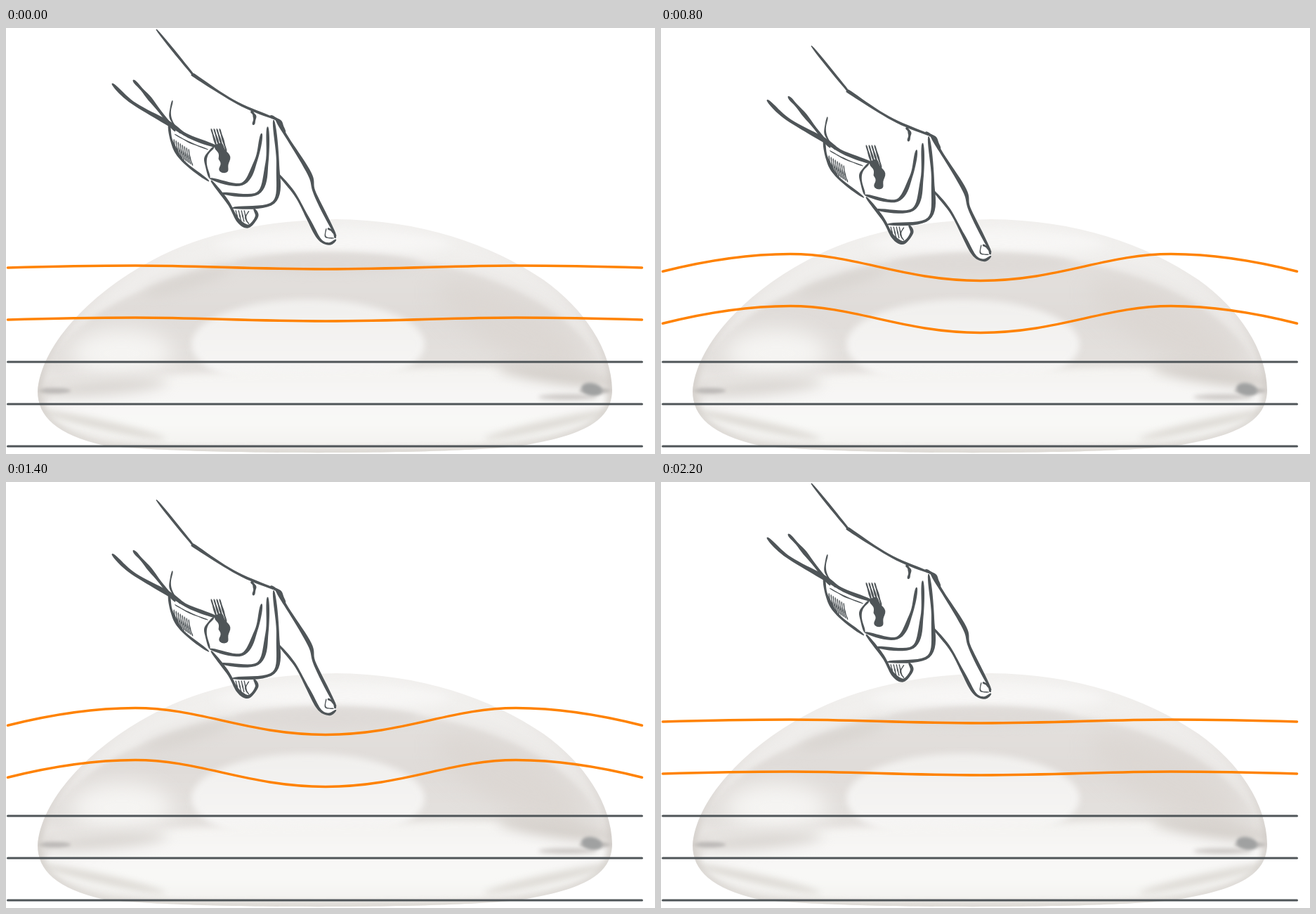
An HTML page with a canvas for the animation above (2.3 s loop, 924x606 px).

```html
<!DOCTYPE html>
<html lang="en">
<head>
<meta charset="utf-8">
<title>Pressure on a gel dome</title>
<style>
html, body { margin: 0; width: 100%; height: 100%; overflow: hidden; background: #fff; }
canvas { display: block; }
</style>
</head>
<body>
<canvas id="stage" width="924" height="606"></canvas>
<script>
const W = 924, H = 606, STEP = 100, STEPS = 23, PEAK = 11;
const INK = '#4f5558', ORANGE = '#ff8200';
const LEFT = 2.5, RIGHT = 905.5, MIDDLE = 455;
const ctx = document.getElementById('stage').getContext('2d');
const mix = (a, b, t) => a + (b - a) * t;

// Smooth curve through x, y pairs, as a list of points.
function curve(...xy) {
  const at = (i, axis) => xy[2 * Math.max(0, Math.min(xy.length / 2 - 1, i)) + axis];
  const spline = (i, t, axis) => {
    const [a, b, c, d] = [-1, 0, 1, 2].map(o => at(i + o, axis));
    return b + 0.5 * t * (c - a + t * (2 * a - 5 * b + 4 * c - d + t * (3 * (b - c) + d - a)));
  };
  const points = [];
  for (let s = 0; s <= (xy.length / 2 - 1) * 10; s++) {
    const i = Math.floor(s / 10), t = s % 10 / 10;
    points.push([spline(i, t, 0), spline(i, t, 1)]);
  }
  return points;
}

function shape(points) {
  const path = new Path2D();
  points.forEach(([x, y]) => path.lineTo(x, y));
  path.closePath();
  return path;
}

// Pen stroke along a curve: pointed ends, slightly uneven pressure.
function brush(width, points) {
  const left = [], right = [], last = points.length - 1;
  points.forEach(([x, y], i) => {
    const p = points[Math.max(0, i - 1)], q = points[Math.min(last, i + 1)];
    const t = i / last, dx = q[0] - p[0], dy = q[1] - p[1];
    const press = 0.25 + 0.6 * Math.sqrt(Math.sin(Math.PI * t) + 1e-9) + 0.15 * Math.sin(16 * t);
    const s = width * press / 2 / (Math.hypot(dx, dy) || 1);
    left.push([x - dy * s, y + dx * s]);
    right.unshift([x + dy * s, y - dx * s]);
  });
  return shape(left.concat(right));
}

function makeHand() {
  const back = curve(214, 2, 262, 61, 270, 69, 330, 107, 388, 131);
  const fingerTop = curve(384, 128, 398, 152, 432, 207, 440, 236, 470, 296);
  const fingerUnder = curve(386, 206, 411, 236, 430, 271, 446, 300, 460, 307, 470, 301);
  const heel = curve(232, 135, 236, 161, 252, 189, 289, 218);
  const pinky = curve(292, 217, 316, 248, 330, 273, 345, 282, 357, 268, 353, 257);
  const cuff = curve(151, 79, 180, 106, 232, 136, 260, 154, 303, 170);
  const ink = [
    brush(5, back), brush(6, fingerTop), brush(5, fingerUnder),
    brush(5, heel), brush(6, pinky), brush(7, cuff),
    brush(6, curve(181, 74, 205, 101, 241, 147)),
    brush(3, curve(237, 103, 234, 127, 248, 150)),
    brush(6, curve(376, 125, 390, 134, 397, 150)),
    brush(5, curve(349, 118, 354, 126, 352, 138)),
    brush(4, curve(296, 169, 284, 186, 290, 214)),
    brush(2, curve(240, 151, 262, 163, 288, 173)),
    brush(2, curve(456, 285, 455, 297, 467, 299)),
    brush(4, curve(458, 285, 466, 290, 469, 299)),
    brush(2, curve(346, 260, 341, 270, 346, 279)),
    brush(17, curve(301, 165, 311, 185, 309, 206))
  ];
  // curled fingers, from the inner one to the outer one
  for (const t of [0, 0.5, 1]) {
    ink.push(brush(6, curve(
      mix(364, 381, t), mix(150, 131, t), mix(356, 387, t), mix(188, 195, t),
      mix(336, 381, t), mix(222, 248, t), mix(290, 322, t), mix(214, 256, t))));
  }
  // creases above the hollow, then shading on the heel and the little finger
  for (let i = 0; i < 4; i++) {
    ink.push(brush(3, curve(292 + 4 * i, 143, 302 + 4 * i, 176)));
    ink.push(brush(2, curve(327 + 4 * i, 259, 331 + 4 * i, 276)));
  }
  for (let i = 0; i < 8; i++) {
    const x = 239 + 3 * i, y = 158 + 2 * i;
    ink.push(brush(2, curve(x, y, x + 2, y + 13, x + 6, y + 24)));
  }
  const skin = shape([...back, ...fingerTop, ...fingerUnder.reverse(), ...pinky.reverse(), ...heel.reverse(), ...cuff.reverse().slice(-24)]);
  return { skin, ink };
}

function fade(g, top, bottom, ...colors) {
  const grad = g.createLinearGradient(0, top, 0, bottom);
  colors.forEach((c, i) => grad.addColorStop(i / (colors.length - 1), c));
  return grad;
}

function makeDome() {
  const c = document.createElement('canvas');
  c.width = W; c.height = H;
  const g = c.getContext('2d');
  const layer = (path, fill, blur) => {
    g.filter = `blur(${blur}px)`;
    g.fillStyle = fill;
    g.fill(path);
  };
  const glow = (x, y, rx, ry, turn, fill, blur) => {
    const path = new Path2D();
    path.ellipse(x, y, rx, ry, turn, 0, 2 * Math.PI);
    layer(path, fill, blur);
  };
  const rim = new Path2D(`M45 517C49 455 115 380 207 331C280 291 375 273 470 272
    C590 273 690 307 765 358C824 400 862 458 863 515C863 558 822 580 735 594
    C640 607 270 608 140 594C72 579 45 552 45 517Z`);
  g.clip(rim);
  g.fillStyle = fade(g, 272, H, '#f3f2f0', '#eeecea', '#e9e6e3', '#efedea');
  g.fill(rim);
  glow(465, 305, 170, 18, 0, '#f7f6f5', 9);

  // grey body below the bright rim
  layer(new Path2D('M55 490C100 380 310 319 455 319C610 319 800 370 852 490Z'),
    fade(g, 320, 490, '#e4e1de', '#e0dcd9', '#e5e2df'), 3);
  glow(455, 336, 130, 14, 0, '#dedad7', 6);
  glow(260, 360, 65, 10, -0.3, '#d9d5d1', 8);
  glow(720, 425, 120, 38, 0.5, '#dcd7d3', 16);

  // reflections
  glow(165, 463, 72, 34, 0, '#f5f4f2', 15);
  glow(430, 450, 166, 64, 0, fade(g, 386, 490, '#f0efed', '#f6f5f4'), 5);

  // lower half
  layer(new Path2D('M70 506Q260 488 530 488Q740 472 850 505L862 555Q740 606 455 606Q170 606 50 553Z'),
    fade(g, 480, H, '#f3f2ef', '#f7f6f5', '#f8f8f6', '#f1f0ed'), 5);
  glow(135, 511, 95, 11, -0.08, '#d8d4d0', 9);
  glow(785, 495, 85, 11, 0.14, '#d3cec9', 8);
  glow(450, 602, 330, 5, 0, '#e3e0db', 4);
  for (const side of [-1, 1]) {
    glow(454 + side * 320, 564, 95, 7, side * -0.22, '#dfdcd7', 5);
    glow(454 + side * 385, 516, 23, 4, 0, '#bdbab8', 2);
  }
  glow(800, 525, 42, 4, 0, '#cbc7c4', 3);
  glow(834, 514, 15, 9, 0.2, '#a0a1a1', 2);

  // soft shaded sides
  g.filter = 'blur(5px)';
  g.lineWidth = 7;
  g.strokeStyle = fade(g, 300, H, '#f0eeec', '#e4e0dd', '#cac5c0', '#d8d4cf');
  g.stroke(rim);
  return c;
}

// Two crests rise while the trough below the fingertip sinks.
function wave(y, p) {
  const edge = y - 0.3 + 0.65 * p, crest = y - 3.4 - 2.06 * p, trough = y + 1.6 + 2.06 * p;
  const path = new Path2D();
  for (const [end, side] of [[LEFT, -1], [RIGHT, 1]]) {
    const top = MIDDLE + side * 271;
    path.moveTo(end, edge);
    path.bezierCurveTo(mix(end, top, 0.31), mix(edge, crest, 0.57), mix(end, top, 0.66), crest, top, crest);
    path.bezierCurveTo(top - side * 93, crest, MIDDLE + side * 111, trough, MIDDLE, trough);
  }
  return path;
}

function line(path, color, width) {
  ctx.strokeStyle = color;
  ctx.lineWidth = width;
  ctx.lineCap = 'round';
  ctx.stroke(path);
}

const dome = makeDome(), hand = makeHand();

function draw(p) {
  ctx.fillStyle = '#fff';
  ctx.fillRect(0, 0, W, H);
  ctx.drawImage(dome, 0, 0);
  for (const y of [475, 535, 595]) line(new Path2D(`M${LEFT} ${y}H${RIGHT}`), INK, 3);
  for (const y of [341.3, 415.3]) line(wave(y, p), ORANGE, 3.5);
  ctx.save();
  ctx.translate(0, p * 2.92);
  ctx.fillStyle = '#fff';
  ctx.fill(hand.skin);
  ctx.fillStyle = INK;
  hand.ink.forEach(s => ctx.fill(s));
  ctx.restore();
}

const start = performance.now();
function tick() {
  const k = Math.floor((performance.now() - start) / STEP) % STEPS;
  draw(PEAK - Math.abs(k - PEAK));
  requestAnimationFrame(tick);
}
tick();
</script>
</body>
</html>
```
